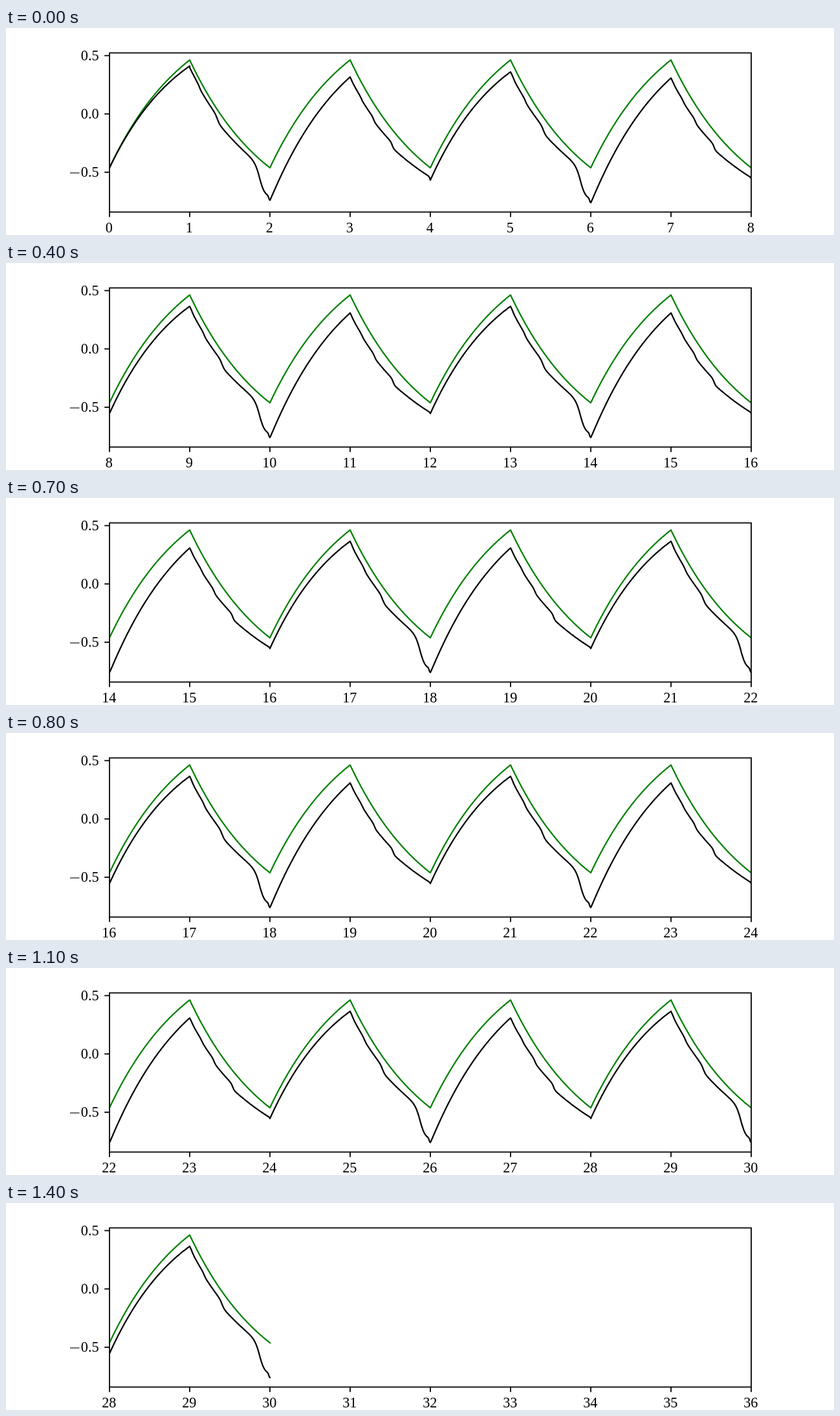
Animation of 1280x320 px, one loop 1500 ms. Source, as an HTML page with a canvas:

```html
<!DOCTYPE html>
<html lang="en">
<head>
<meta charset="utf-8">
<title>Scrolling response plot</title>
<style>
  html, body { margin: 0; width: 100%; height: 100%; overflow: hidden; background: #fff; }
  canvas { display: block; }
</style>
</head>
<body>
<canvas id="plot" width="1280" height="320"></canvas>
<script>
const ctx = document.getElementById('plot').getContext('2d');
const LEFT = 160, RIGHT = 1152, TOP = 38.5, BOTTOM = 284.5;
const UNIT = 124, ZERO = 132.8, SCALE = 180.3;
const STEP_MS = 100, STEPS = 15, END = 30, DT = 0.005;

const toY = v => ZERO - v * SCALE;
const toValue = y => (ZERO - y) / SCALE;
const sigmoid = x => 1 / (1 + Math.exp(-x));
// Relaxation from a value towards +1 or -1.
const relax = (from, goal, t) => toY(goal + (from - goal) * Math.exp(-t));

// Two kinds of cycle alternate. Each fall has sudden drops that fade again;
// their times move with the height of the peak before them.
const shallow = {
  lag: 8, ease: 0.55, peak: 77,
  drops: [
    { at: 0.03, by: 2 }, { at: 0.152, by: 2.5 }, { at: 0.303, by: 5 },
    { at: 0.535, by: 7.5 }, { at: 1.005, by: 6.5, width: 0.005 }
  ]
};
const deep = {
  lag: 11.4, ease: 1.2, peak: 66.7,
  drops: [
    { at: 0.03, by: 2.7 }, { at: 0.178, by: 3.5 }, { at: 0.402, by: 9, width: 0.014 },
    { at: 0.88, by: 48, width: 0.032, fixed: true },
    { at: 0.985, by: 7, width: 0.005, fixed: true }
  ]
};

function riseY(kind, start, n, t) {
  const lag = kind.lag - 2.1 * Math.exp(-n);
  return relax(toValue(start), 1, t) + lag * t ** kind.ease;
}

function fallY(kind, start, t) {
  const shift = 0.007 * (start - kind.peak);
  let y = relax(toValue(start), -1, t);
  for (const { at, by, width = 0.01, fixed } of kind.drops) {
    const dt = t - at - (fixed ? 0 : shift);
    y += by * sigmoid(dt / width) * Math.exp(-2 * Math.max(dt, 0));
  }
  return y;
}

const green = new Path2D(), black = new Path2D();
const amplitude = Math.tanh(0.5);
let start = toY(-amplitude);
for (let n = 0; n < END; n++) {
  const rising = n % 2 === 0, goal = rising ? 1 : -1;
  const kind = n % 4 < 2 ? deep : shallow;
  let y;
  for (let i = 0; i <= 1 / DT; i++) {
    const t = i * DT, x = (n + t) * UNIT;
    y = rising ? riseY(kind, start, n, t) : fallY(kind, start, t);
    green.lineTo(x, relax(-goal * amplitude, goal, t));
    black.lineTo(x, y);
  }
  start = y;
}

function line(x0, y0, x1, y1) {
  ctx.beginPath();
  ctx.moveTo(x0, y0);
  ctx.lineTo(x1, y1);
  ctx.stroke();
}

function drawCurves(first) {
  ctx.save();
  ctx.beginPath();
  ctx.rect(LEFT, TOP, RIGHT - LEFT, BOTTOM - TOP);
  ctx.clip();
  ctx.translate(LEFT - first * UNIT, 0);
  ctx.lineWidth = 2.22;
  ctx.lineJoin = 'round';
  ctx.lineCap = 'square';
  ctx.strokeStyle = '#008000';
  ctx.stroke(green);
  ctx.strokeStyle = '#000';
  ctx.stroke(black);
  ctx.restore();
}

function drawAxes(first) {
  ctx.strokeStyle = ctx.fillStyle = '#000';
  ctx.lineWidth = 1.78;
  ctx.strokeRect(LEFT, TOP, RIGHT - LEFT, BOTTOM - TOP);
  ctx.font = '22.2px "Liberation Serif", "Times New Roman", serif';
  ctx.textAlign = 'center';
  for (let i = 0; i <= 8; i++) {
    const x = LEFT + i * UNIT;
    line(x, BOTTOM, x, BOTTOM + 7.8);
    ctx.fillText(first + i, x - 0.7, 316);
  }
  ctx.textAlign = 'right';
  for (const v of [0.5, 0, -0.5]) {
    const y = toY(v);
    line(LEFT - 7.8, y, LEFT, y);
    ctx.fillText(Math.abs(v).toFixed(1), 143.6, y + 7.3);
  }
  ctx.fillRect(99, 223.5, 14.5, 1.1); // wide minus sign
}

function draw() {
  const first = 2 * (Math.floor(performance.now() / STEP_MS) % STEPS);
  ctx.fillStyle = '#fff';
  ctx.fillRect(0, 0, 1280, 320);
  drawCurves(first);
  drawAxes(first);
  requestAnimationFrame(draw);
}
draw();
</script>
</body>
</html>
```
